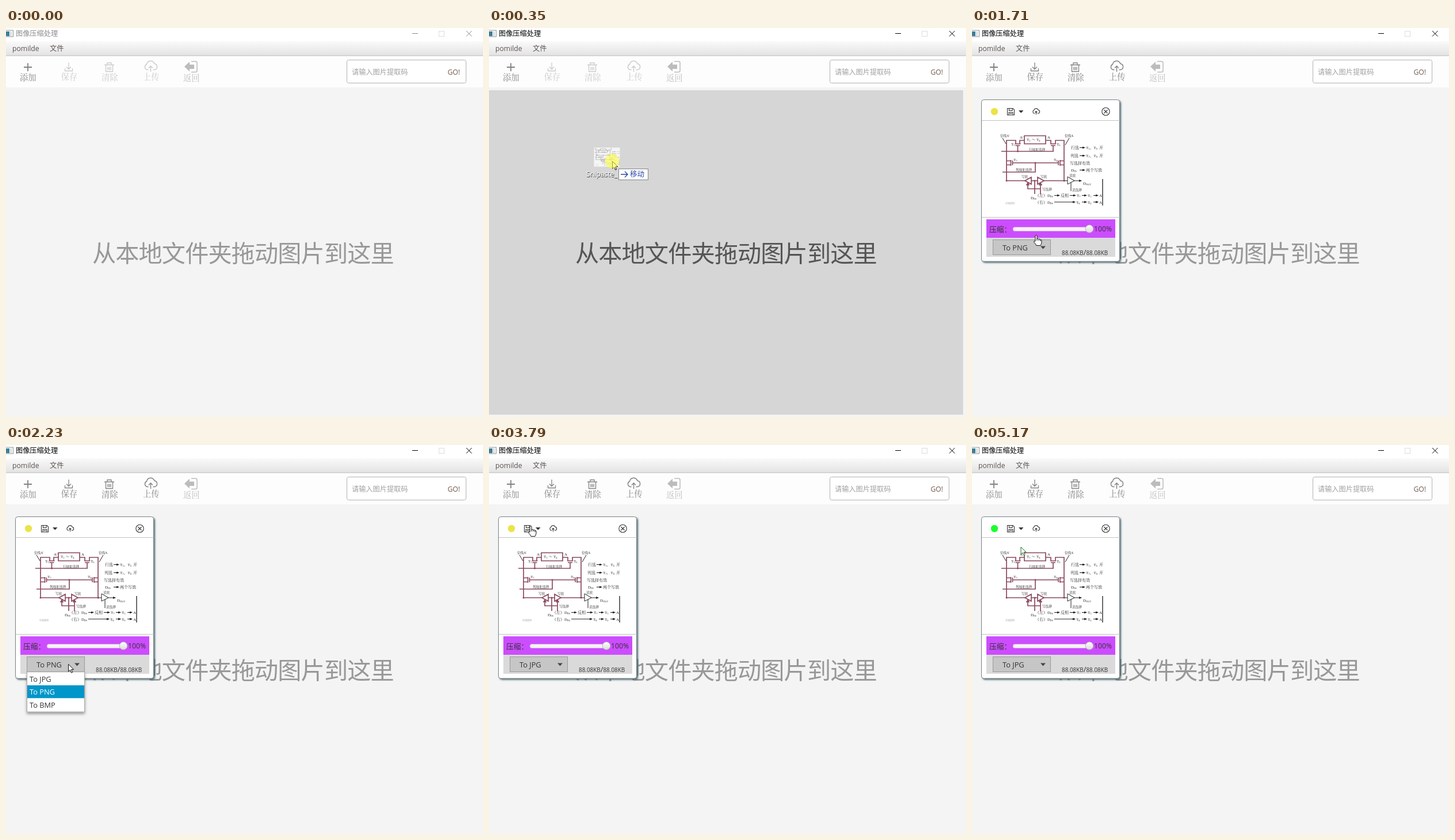
These frames come from a looping animation (829 by 675 pixels, 5.68 s). An HTML page:

```html
<!DOCTYPE html>
<html lang="zh-CN">
<head>
<meta charset="utf-8">
<title>图像压缩处理</title>
<style>
  html, body { margin: 0; width: 100%; height: 100%; overflow: hidden; background: #f4f4f4; }
  svg { display: block; width: 100%; height: 100%; }
  text { font-family: "Open Sans", "Noto Sans CJK SC", "Noto Sans CJK", sans-serif; font-size: 12.2px; white-space: pre; }
  .line { fill: none; stroke: currentColor; }
  .tool text { fill: currentColor; font-size: 14.3px; font-family: "Noto Serif CJK SC", "Noto Sans CJK SC", "Noto Sans CJK", serif; }
  .tool { color: #828282; }
  .off { color: #cbcbcb; }
  .item { font-size: 12.8px; fill: #333; }
  .note text { font-family: "Liberation Serif", "Noto Serif CJK SC", "Noto Sans CJK SC", serif; font-size: 5.6px; fill: #222; }
  .note .big { font-size: 7px; }
  .note .sub { font-size: 4.5px; }
  #hint { font-size: 41.2px; letter-spacing: -.9px; }
</style>
</head>
<body>
<svg viewBox="0 0 829 675">
  <defs>
    <linearGradient id="bar" x2="0" y2="1"><stop stop-color="#fafafa"/><stop offset="1" stop-color="#e3e3e3"/></linearGradient>
    <linearGradient id="knob" x2="0" y2="1"><stop stop-color="#fff"/><stop offset="1" stop-color="#d9d9d9"/></linearGradient>
    <filter id="cardShadow" x="-10%" y="-10%" width="120%" height="120%"><feDropShadow dx="2" dy="2" stdDeviation="1.4" flood-color="#3f626b" flood-opacity=".9"/></filter>
    <filter id="popShadow" x="-20%" y="-20%" width="140%" height="150%"><feDropShadow dx="0" dy="3" stdDeviation="2.8" flood-opacity=".4"/></filter>
    <filter id="labelShadow"><feDropShadow dx=".7" dy=".9" stdDeviation=".6"/></filter>
    <path id="cloud" d="M7.5 15.5H5.5A5 5 0 0 1 4.5 6A7 7 0 0 1 18 5A5.3 5.3 0 0 1 18 15.5H15.5M11.5 19V9.5M8 12.5L11.5 9L15 12.5"/>
    <marker id="tip" markerWidth="5" markerHeight="4" refX="4" refY="2" orient="auto" markerUnits="userSpaceOnUse"><path d="M0 0L5 2L0 4Z" fill="#222"/></marker>
  </defs>

  <rect width="829" height="675" fill="#f4f4f4"/>
  <rect width="829" height="23" fill="#fff"/>
  <rect y="23" width="829" height="25" fill="url(#bar)"/>
  <rect y="48" width="829" height="55" fill="#fdfdfd"/>
  <path d="M0 48H829" stroke="#b9b9b9"/>
  <rect x="-.5" y="4" width="13" height="11" fill="#f8f8f8" stroke="#8a9499"/>
  <rect y="6" width="6" height="8" fill="#3c7f98"/>
  <path d="M8.5 6V14" stroke="#aab2b5"/>
  <g id="titleBar">
    <text x="17" y="14" fill="currentColor">图像压缩处理</text>
    <path class="line" d="M706 9.5H716M800 5L809.5 14.5M809.5 5L800 14.5"/>
  </g>
  <rect x="752.5" y="5.5" width="9" height="9" fill="none" stroke="#ddd"/>
  <text x="11" y="40" fill="#5d5350">pomilde</text>
  <text x="76" y="40" fill="#5d5350">文件</text>

  <g class="tool">
    <path class="line" stroke-width="1.8" d="M31 68H45M38 61V75"/>
    <text x="24" y="91">添加</text>
  </g>
  <g class="tool needsImage">
    <path class="line" stroke-width="1.3" d="M109 60V71M105 67.5L109 71.5L113 67.5M102.5 70V74.5H115.5V70"/>
    <text x="95.5" y="90">保存</text>
  </g>
  <g class="tool needsImage">
    <path class="line" stroke-width="1.3" d="M171 64H188M173.5 64V75.5H185.5V64M176 64V60.5H183V64M177 67.5V73M179.5 67.5V73M182 67.5V73"/>
    <text x="166" y="91">清除</text>
  </g>
  <g class="tool needsImage">
    <use href="#cloud" class="line" stroke-width="1.4" x="240" y="57"/>
    <text x="238" y="90">上传</text>
  </g>
  <g class="tool" style="color:#bcbcbc">
    <path d="M310 67L319 58.5V63.5H327V71H319V75.5Z" fill="currentColor"/>
    <path class="line" stroke-width="1.5" d="M322 58H329.5Q332 58 332 60.5V74Q332 76.5 329.5 76.5H322"/>
    <text x="308" y="92">返回</text>
  </g>

  <rect x="592.5" y="55.5" width="207" height="40" rx="3" fill="#fff" stroke="#b2b2b2"/>
  <text x="601" y="80.5" fill="#a0a0a0">请输入图片提取码</text>
  <text x="767.5" y="80.5" fill="#70594c">GO!</text>

  <rect id="dropZone" y="108" width="824" height="563" fill="#d6d6d6"/>
  <text id="hint" x="150" y="406">从本地文件夹拖动图片到这里</text>

  <g id="card">
    <rect x="16.5" y="124.5" width="240" height="280.5" rx="4" fill="#fff" stroke="#7c8487" filter="url(#cardShadow)"/>
    <path d="M17 160.5H257M17 328.5H257" stroke="#c3c3c3"/>
    <circle id="status" cx="39" cy="145" r="6.2"/>
    <g class="line" style="color:#333" stroke-width="1.1">
      <path d="M61.5 139.5H71L73.5 142V151H61.5ZM64.5 139.5V143.5H70V139.5M64 151V146.5H71V151M65.5 148.5H69.5"/>
      <use href="#cloud" transform="translate(105 139.5) scale(.56)" stroke-width="1.9"/>
      <circle cx="232.5" cy="145" r="6.7"/>
      <path d="M229.5 142L235.5 148M235.5 142L229.5 148"/>
    </g>
    <path d="M81 143H89.5L85.2 147.5Z" fill="#333"/>

    <g id="circuit" class="note">
      <g fill="none" stroke="#8b4a5e" stroke-width="1.7">
        <path d="M76 201V195H60V265H92M83 201V195H91M128 195H137V201M145 201V195H160V265H125M103 265H114"/>
        <path d="M91 187H128V201H91ZM74.5 201H84.5M75.5 204H83.5M79.5 204V214M136 201H146M137 204H145M141 204V214M51 214H142"/>
        <path d="M67.5 229V239M70.5 230V238M70.5 234H150M150 230V238M153 229V239M60 230.5H67M60 237.5H67M153 230.5H160M153 237.5H160M110 234V250H53"/>
        <path d="M92 265L103 259V271ZM125 265L114 259V271ZM109 265V288M97 268V279H119V268M119 279V288M94.5 273L97 269L99.5 273M116.5 273L119 269L121.5 273"/>
      </g>
      <g fill="#8b4a5e"><circle cx="60" cy="265" r="1.5"/><circle cx="160" cy="265" r="1.5"/><circle cx="110" cy="234" r="1.5"/><circle cx="79.5" cy="214" r="1.5"/><circle cx="109" cy="265" r="1.5"/></g>
      <g fill="none" stroke="#222">
        <path d="M53 191L59 201M169 191L162 203M160 265H166M166 258V271L178 265ZM172 268V283"/>
        <path d="M227 262V308" stroke="#444" stroke-width="1.6"/>
        <g marker-end="url(#tip)">
          <path d="M178 265H190"/><path d="M187 207.5H196"/><path d="M187 221.5H196"/><path d="M187 246.5H196"/>
          <path d="M143 290.5H152"/><path d="M170 290.5H180"/><path d="M191 290.5H199"/><path d="M211 290.5H219"/>
          <path d="M143 302H179"/><path d="M191 302H199"/><path d="M211 302H219"/>
        </g>
      </g>
      <text x="49" y="189">位线A′</text><text x="161" y="189">位线A</text>
      <text class="big" x="83" y="192">A′</text><text class="big" x="131" y="192">A</text>
      <text class="big" x="95" y="196">T<tspan class="sub" dy="1">1</tspan><tspan dy="-1"> ～ </tspan>T<tspan class="sub" dy="1">4</tspan></text>
      <text class="big" x="68" y="204">T<tspan class="sub" dy="1">5</tspan></text><text class="big" x="147" y="204">T<tspan class="sub" dy="1">6</tspan></text>
      <text class="big" x="72" y="231">T<tspan class="sub" dy="1">7</tspan></text><text class="big" x="142" y="231">T<tspan class="sub" dy="1">8</tspan></text>
      <text x="99" y="212.5">行地址选择</text><text x="76" y="248">列地址选择</text>
      <text x="86" y="260">写放</text><text x="119" y="260">写放</text><text x="169" y="257.5">读放</text>
      <text x="122" y="282">写选择</text><text x="174" y="283">读选择</text>
      <text class="big" x="193" y="272">D<tspan class="sub" dy="1">OUT</tspan></text><text class="big" x="102" y="297">D<tspan class="sub" dy="1">IN</tspan></text>
      <text class="big" x="172" y="210">行选</text><text class="big" x="198" y="210">T<tspan class="sub" dy="1">5</tspan><tspan dy="-1">、T</tspan><tspan class="sub" dy="1">6</tspan></text><text class="big" x="221" y="210">开</text>
      <text class="big" x="171" y="224">列选</text><text class="big" x="198" y="224">T<tspan class="sub" dy="1">7</tspan><tspan dy="-1">、T</tspan><tspan class="sub" dy="1">8</tspan></text><text class="big" x="221" y="224">开</text>
      <text class="big" x="170" y="236.5">写选择有效</text>
      <text class="big" x="172" y="249">D<tspan class="sub" dy="1">IN</tspan></text><text class="big" x="198" y="249">两个写放</text>
      <text class="big" x="110" y="293">（左）D<tspan class="sub" dy="1">IN</tspan></text><text class="big" x="154" y="293">反相</text>
      <text class="big" x="182" y="293">T<tspan class="sub" dy="1">7</tspan></text><text class="big" x="201" y="293">T<tspan class="sub" dy="1">5</tspan></text><text class="big" x="221" y="293">A′</text>
      <text class="big" x="110" y="304.5">（右）D<tspan class="sub" dy="1">IN</tspan></text>
      <text class="big" x="181" y="304.5">T<tspan class="sub" dy="1">8</tspan></text><text class="big" x="201" y="304.5">T<tspan class="sub" dy="1">6</tspan></text><text class="big" x="221" y="304.5">A</text>
      <text x="58" y="305.5" style="font-size:4px;fill:#999">存储器图</text>
    </g>

    <rect x="25" y="332" width="224" height="32" fill="#cc4dff"/>
    <rect x="25" y="364" width="224" height="33" fill="#dadada"/>
    <text class="item" x="30" y="353.5">压缩：</text>
    <rect x="71" y="345.5" width="140" height="7" rx="3.5" fill="#f6f1f8" stroke="#c9a5d6" stroke-width=".7"/>
    <circle cx="204" cy="348.5" r="6.8" fill="url(#knob)" stroke="#aaa" stroke-width=".8"/>
    <text x="212" y="353.3" fill="#333">100%</text>
    <rect x="36.5" y="367.5" width="100" height="26" fill="#c6c6c6" stroke="#999"/>
    <text class="item" id="format" x="53" y="385.5"></text>
    <path d="M119 378.5H128L123.5 383.5Z" fill="#444"/>
    <text x="156" y="394" fill="#333" style="font-size:9.9px">88.08KB<tspan style="font-size:13px">/</tspan>88.08KB</text>
  </g>

  <g id="formatMenu">
    <rect x="36.5" y="394" width="100" height="69" fill="#fff" stroke="#aaa" filter="url(#popShadow)"/>
  </g>
  <g id="saveMenu">
    <rect x="45.5" y="157.5" width="56" height="55" fill="#fff" stroke="#b8b8b8" filter="url(#popShadow)"/>
    <rect id="saveRow" x="47" y="161" width="54" height="24" fill="#626497"/>
    <text id="saveText" x="52" y="178">保存</text>
    <text x="52" y="202" fill="#333">另存为</text>
  </g>

  <g id="drag">
    <rect x="182.5" y="207.5" width="45" height="33" fill="#f5f5f5" stroke="#e4e4e4"/>
    <use href="#circuit" transform="translate(171.5 164) scale(.243)" opacity=".8" style="filter:grayscale(1)"/>
    <text x="169" y="258" fill="#fff" filter="url(#labelShadow)">Snipaste_</text>
    <rect x="225.5" y="244.5" width="51" height="19" fill="#fff" stroke="#858585"/>
    <path d="M229 254H241M236 249L241 254L236 259" fill="none" stroke="#2744a8" stroke-width="1.3"/>
    <text x="245" y="258" fill="#2744a8" style="font-size:12.5px">移动</text>
  </g>
  <g id="pointer">
    <path id="arrow" d="M.5 .5V13L3.5 10.3L5.7 15.3L7.7 14.4L5.6 9.5H9.7Z" fill="#fff"/>
    <path id="hand" d="M-1.5 11V2Q-1.5 .5 0 .5T1.5 2V7Q4 5.5 4.5 7.5Q7 6.3 7.3 8.5Q9.5 8 9.5 10V13Q9 16 7.5 18.5H.5Q-1 15-4 12.5Q-4.5 10-1.5 11ZM1.5 7V10M4.5 7.5V10M7.3 8.5V11" fill="#fff" stroke="#111"/>
    <circle id="press" r="12.4" fill="#ffff3c" opacity=".58"/>
  </g>
</svg>
<script>
const LOOP = 5680;
const $ = id => document.getElementById(id);
const show = (id, on) => { $(id).style.display = on ? "" : "none"; };
const fill = (id, color) => $(id).setAttribute("fill", color);

// start time, hotspot x, hotspot y, shape
const pointerStops = [
  [180, 202, 228, "arrow"], [350, 214, 231, "arrow"], [1540, 211, 239, "arrow"],
  [1710, 111.5, 359, "hand"], [1890, 108, 378, "arrow"], [2060, 108, 380, "arrow"],
  [2580, 107, 400, "arrow"], [2750, 107, 405, "arrow"], [3440, 76, 192, "arrow"],
  [3620, 73, 160, "arrow"], [3790, 72.5, 140, "hand"], [4140, 82, 160, "arrow"],
  [4320, 85, 176, "hand"], [5170, 84.5, 176.5, "arrow"]
];

const formats = ["JPG", "PNG", "BMP"];
$("formatMenu").innerHTML += formats.map((name, i) =>
  `<rect id="row${name}" x="37" y="${394.5 + i * 22.5}" width="99" height="22.5"/>
   <text class="item" id="text${name}" x="41" y="${410.5 + i * 22.5}">To ${name}</text>`).join("");

function draw(t) {
  const within = (from, to) => t >= from && t < to;
  const dragging = within(180, 1210), loaded = t >= 1210;
  const selected = t < 3100 ? "PNG" : "JPG";

  $("titleBar").style.color = t < 180 ? "#8c8c8c" : "#000";
  document.querySelectorAll(".needsImage").forEach(el => el.classList.toggle("off", !loaded));
  show("dropZone", dragging);
  show("drag", dragging);
  $("drag").setAttribute("transform", t < 350 ? "translate(-12 -3)" : "");
  fill("hint", dragging ? "#555" : "#989898");
  show("card", loaded);
  fill("status", t < 5170 ? "#ece348" : "#1aff2e");
  $("format").textContent = "To " + selected;

  show("formatMenu", within(2230, 3270));
  for (const name of formats) {
    const hovered = name === "JPG" && t >= 2580;
    fill("row" + name, name === selected ? "#0096c9" : hovered ? "#cce3f4" : "#fff");
    $("text" + name).style.fill = name === selected ? "#fff" : "#333";
  }
  show("saveMenu", within(3960, 5170));
  show("saveRow", t >= 4320);
  fill("saveText", t >= 4320 ? "#fff" : "#333");

  const stop = pointerStops.findLast(s => s[0] <= t);
  show("pointer", stop);
  if (!stop) return;
  const [, x, y, shape] = stop;
  $("pointer").setAttribute("transform", `translate(${x} ${y})`);
  show("arrow", shape === "arrow");
  show("hand", shape === "hand");
  show("press", dragging || within(3100, 3270) || within(5010, 5170));
  $("arrow").setAttribute("stroke", t >= 5170 ? "#1d6b28" : "#111");
}

function tick() {
  draw(performance.now() % LOOP);
  requestAnimationFrame(tick);
}
tick();
</script>
</body>
</html>
```
